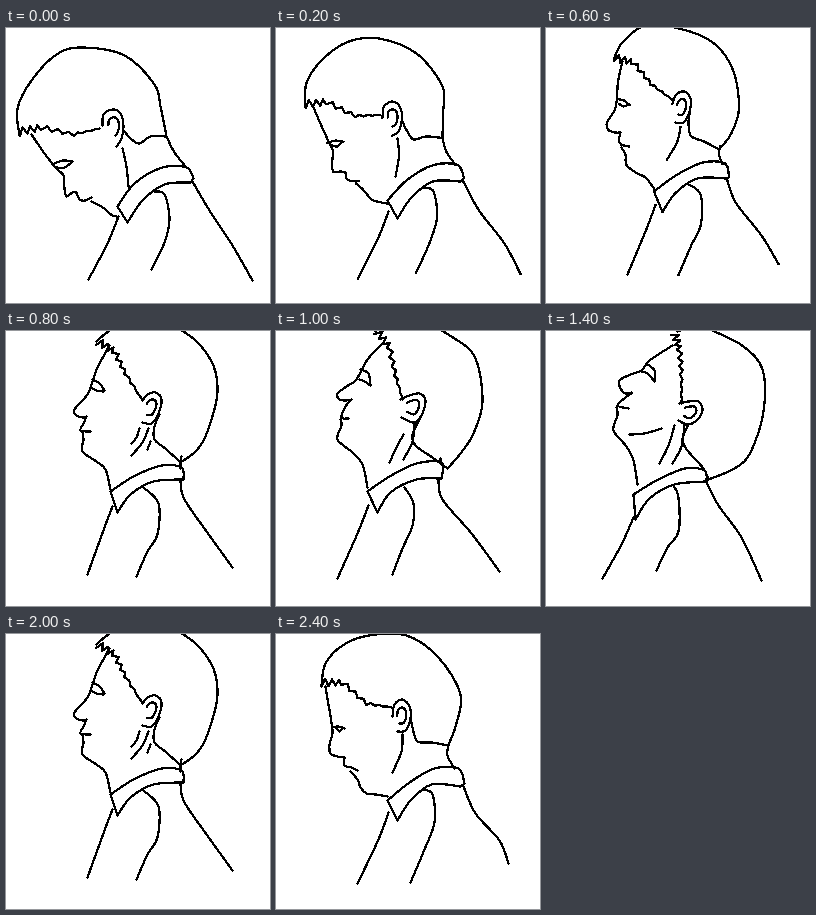
These frames come from a looping animation (264x275 px, 2.6 s). An HTML page:

```html
<!DOCTYPE html>
<html lang="en">
<head>
<meta charset="utf-8">
<title>Nodding head</title>
<style>
html, body { margin: 0; width: 100%; height: 100%; overflow: hidden; background: #fff; }
svg { display: block; width: 100%; height: 100%; }
path { fill: none; stroke: #000; stroke-width: 2.3; stroke-linecap: round; stroke-linejoin: round; shape-rendering: crispEdges; }
</style>
</head>
<body>
<svg viewBox="-.5 -.5 264 275"><path id="line"/></svg>
<script>
const STEP = 200;

// Key poses: a stroke is a smooth curve through a few points,
// with the same number of points in every pose.
const down = {
  skull: '13,107 11,80 25,52 50,26 75,19 118,27 148,56 154,78 160,108',
  fringe: '13,103 35,99 67,106 93,100',
  ear: '96,97 97,86 106,81 114,85 117,98 115,110 110,118',
  hair: '118,103 124,110 133,115 144,108 160,108',
  nape: '160,108 168,124 180,139',
  neck: '116,120 120,138 122,158',
  face: '25,106 38,125 50,140 57,147 58,160 60,168 66,164 70,164',
  lips: '70,164 73,171 79,172 85,169',
  chin: '85,173 91,176 98,180 102,184 106,187 110,188',
  eye: '46,136 56,132 66,133',
  lid: '50,139 58,139 66,133',
  collar: '111,178 128,155 156,139 180,139 187,150',
  edge: '121,194 136,172 158,156 184,154',
  back: '186,153 203,182 226,217 246,252',
  front: '112,188 101,215 82,251',
  sleeve: '148,163 158,166 163,190 158,214 145,241'
};
const low = {
  skull: '45,51 49,29 66,11 92,1 130,1 162,23 184,60 179,92 172,110',
  fringe: '45,48 66,48 90,69 115,73',
  ear: '116,82 118,70 126,65 133,72 134,84 129,96 121,97',
  hair: '134,83 136,93 141,107 155,108 172,111',
  nape: '172,110 171,121 178,134',
  neck: '126,100 125,117 116,138',
  face: '49,52 52,70 55,88 56,99 53,110 54,119 61,122 68,123',
  lips: '68,123 68,131 75,133 81,136',
  chin: '74,137 81,145 84,153 90,159 99,160 111,162',
  eye: '56,93 62,92 68,94',
  lid: '60,94 63,97 66,93',
  collar: '111,166 133,148 158,134 182,134 188,149',
  edge: '121,186 134,166 155,150 184,152',
  back: '187,152 199,179 223,206 232,229',
  front: '112,178 102,205 81,249',
  sleeve: '146,155 156,160 158,188 148,215 134,248'
};
const level = {
  skull: '90,10 102,0 130,-16 177,0 204,28 211,60 201,100 190,119 174,131',
  fringe: '92,10 108,20 119,42 136,69',
  ear: '136,69 141,63 149,61 155,68 152,82 145,92 136,91',
  hair: '153,83 148,95 148,108 160,118 174,131',
  nape: '175,125 174,131 174,137',
  neck: '142,97 136,111 125,124',
  cord: '133,97 130,106 125,112',
  nick: '144,110 141,118',
  face: '103,14 91,36 86,50 81,63 68,78 70,84 76,86 80,85',
  lips: '80,85 77,92 74,99 84,100',
  chin: '76,101 77,108 76,120 90,130 99,138 104,158',
  eye: '86,48 93,52 98,59',
  lid: '86,57 90,59 97,60',
  collar: '104,160 127,145 155,134 175,136 177,148',
  edge: '111,181 124,163 147,150 177,148',
  back: '174,150 178,168 203,204 226,236',
  front: '106,175 98,196 81,243',
  sleeve: '137,156 152,172 151,203 141,220 130,245'
};
const high = {
  skull: '99,0 108,-9 138,-13 178,7 199,27 206,70 197,102 184,122 171,137',
  fringe: '101,0 113,16 119,44 126,68',
  ear: '124,68 133,64 143,62 149,69 145,84 137,91 125,86',
  hair: '144,86 136,103 139,114 156,126 171,137',
  nape: '164,127 164,130 165,133',
  neck: '138,92 136,110 127,128',
  cord: '127,103 120,116 113,131',
  face: '107,11 91,28 80,48 73,53 61,62 63,68 69,69 75,68',
  lips: '75,68 69,75 65,86 72,87',
  chin: '64,88 65,94 61,108 76,121 86,133 91,156',
  eye: '84,38 92,42 94,54',
  lid: '83,48 88,50 94,54',
  collar: '91,160 113,145 140,132 165,131 165,147',
  edge: '101,181 114,161 140,148 165,147',
  back: '162,148 166,168 195,202 223,240',
  front: '92,174 81,202 61,247',
  sleeve: '128,156 137,172 136,194 126,217 116,243'
};
const up = {
  skull: '131,0 150,-6 168,0 197,15 216,38 217,80 204,121 188,137 162,148',
  fringe: '128,2 133,18 135,43 135,72',
  ear: '133,72 142,70 152,70 156,79 150,89 141,93 132,89',
  hair: '142,93 136,108 141,119 157,137 162,148',
  nape: '157,137 157,138 158,139',
  neck: '138,93 135,115 126,132',
  cord: '128,94 122,114 113,132',
  jaw: '83,103 98,102 115,97',
  face: '126,14 103,29 95,39 84,43 73,49 74,57 79,62 85,61',
  lips: '85,62 79,66 71,74 82,77',
  chin: '70,76 71,84 67,99 80,115 87,129 91,153',
  eye: '100,32 108,39 108,50',
  lid: '95,40 101,42 108,50',
  collar: '87,163 110,149 138,137 158,139 160,150',
  edge: '89,188 103,167 128,153 160,150',
  back: '160,151 172,174 195,206 215,249',
  front: '87,186 75,213 56,247',
  sleeve: '127,154 132,166 132,200 121,216 110,239'
};

const xy = f => [f(0), f(1)];
const mix = (p, q, u) => xy(k => p[k] + (q[k] - p[k]) * u);
const parse = pose => Object.fromEntries(Object.entries(pose).map(([name, s]) =>
  [name, s.split(' ').map(p => p.split(',').map(Number))]));

// Halfway pose; the back swings out by (dx, dy) at its far end.
function between(a, b, dx, dy) {
  const pose = {};
  for (const name in a) {
    if (b[name]) pose[name] = a[name].map((p, i) => mix(p, b[name][i], .5));
  }
  pose.back = pose.back.map(([x, y], i) => [x + dx * i / 3, y + dy * i / 3]);
  return pose;
}

// Catmull-Rom spline as cubic curves
function curve(p) {
  let d = 'M' + p[0];
  for (let i = 0; i < p.length - 1; i++) {
    const a = p[i - 1] || p[i], b = p[i], c = p[i + 1], e = p[i + 2] || c;
    d += `C${xy(k => b[k] + (c[k] - a[k]) / 6)} ${xy(k => c[k] - (e[k] - b[k]) / 6)} ${c}`;
  }
  return d;
}

// Zigzag along the points, with teeth that shrink towards the end
function jagged(p, teeth, size) {
  const out = [];
  for (let i = 0; i <= teeth; i++) {
    const u = i / teeth * (p.length - 1), k = Math.min(Math.floor(u), p.length - 2);
    const a = p[k], b = p[k + 1], [x, y] = mix(a, b, u - k);
    const h = size * (1 - i / teeth) * (i % 2 ? -1 : 1) / Math.hypot(b[0] - a[0], b[1] - a[1]);
    out.push([x - (b[1] - a[1]) * h, y + (b[0] - a[0]) * h]);
  }
  return 'M' + out.join('L');
}

// Same shape, shrunk about its centre
function shrink(p, scale) {
  const mid = xy(k => p.reduce((sum, q) => sum + q[k], 0) / p.length);
  return p.map(q => mix(mid, q, scale));
}

function outline({ fringe, ...rest }) {
  const { ear, collar, edge } = rest;
  return Object.values(rest).map(curve).join('') +
    jagged(fringe, 18, 4) +
    curve(shrink(ear, .5)) +
    `M${collar[0]}L${edge[0]}M${collar.at(-1)}L${edge.at(-1)}`;
}

const [p0, p2, p4, p5, p7] = [down, low, level, high, up].map(parse);
const poses = [
  p0, between(p0, p2, 5, 5), p2, between(p2, p4, 3, 3), p4, p5, between(p5, p7, 6, 9), p7
].map(outline);

// Up through all poses, back down to the third, then a hard cut to the first
const last = poses.length - 1, count = 2 * last - 1;
const line = document.getElementById('line');
const start = performance.now();
let shown = -1;

function draw(now) {
  const i = Math.floor(Math.max(0, now - start) / STEP) % count;
  const pose = last - Math.abs(last - i);
  if (pose !== shown) line.setAttribute('d', poses[shown = pose]);
  requestAnimationFrame(draw);
}
draw(start);
</script>
</body>
</html>
```
